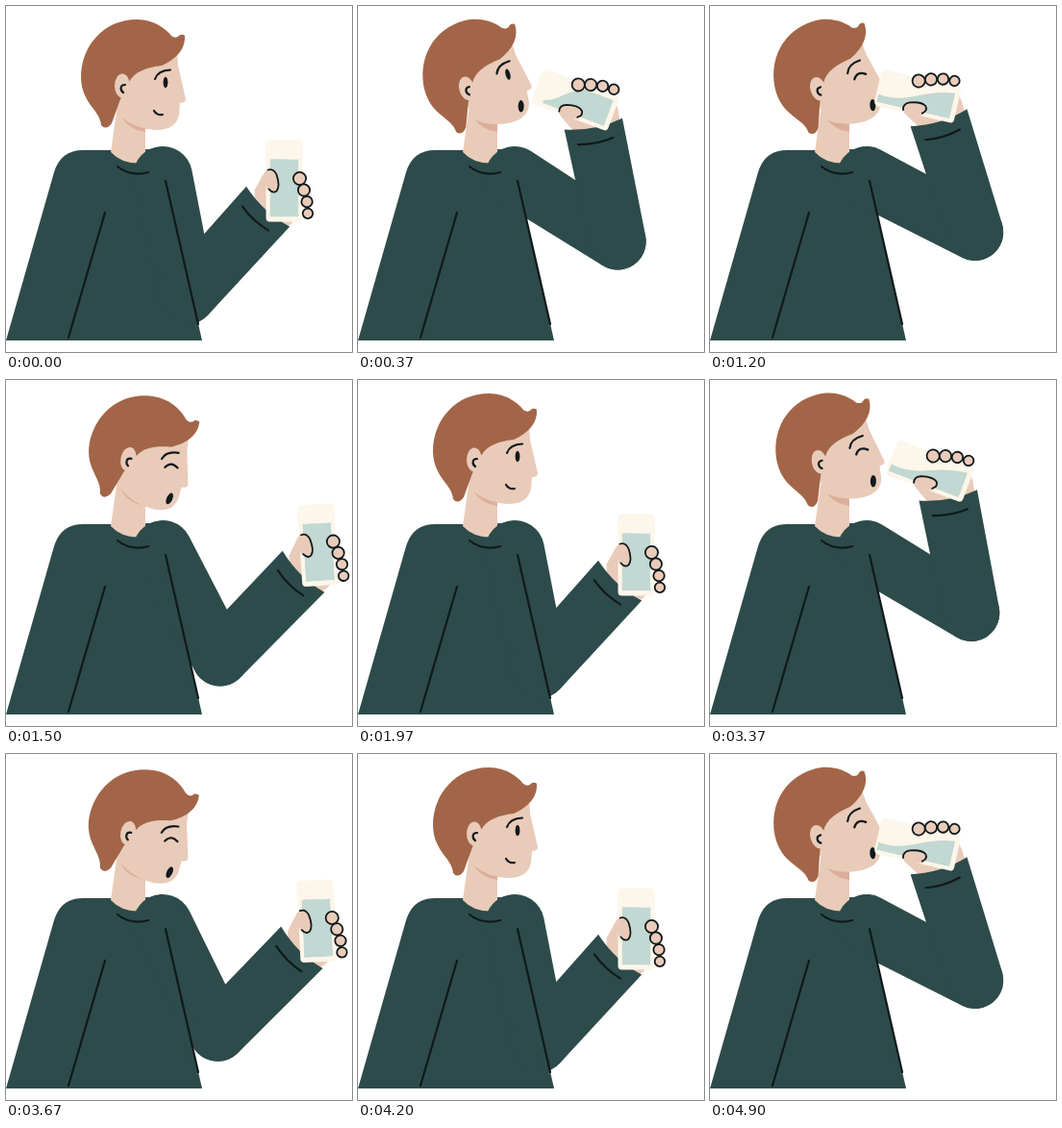
Recreate the animation shown at these times as an HTML page. Size 360 by 360 pixels, loop 5000 ms.

```html
<!DOCTYPE html>
<html lang="en">
<head>
<meta charset="utf-8">
<title>Drinking a glass of water</title>
<style>
  html, body { margin: 0; height: 100%; overflow: hidden; background: #fff; }
  svg { display: block; width: 100vw; height: 100vh; }
  .skin { fill: #e9cbb9; }
  .hair { fill: #a36548; }
  .wool { fill: #2d4b4a; }
  .cream { fill: #fdf6ea; }
  .ink { fill: none; stroke: #10191b; stroke-width: 2.2; stroke-linecap: round; }
  .thin { stroke-width: 1.8; }
  .dot { fill: #10191b; }
</style>
</head>
<body>
<svg viewBox="0 0 360 360">
  <defs>
    <clipPath id="inner"><path d="M-15-40H15V38H-15Z"/></clipPath>
  </defs>

  <path class="wool" d="M0 348L50 173Q57 150 80 150L110 150L150 149Q158 146 166 147L166 181L204 348Z"/>
  <path class="skin" d="M117 96L109 152Q122 166 145 163V100Z"/>
  <path d="M119 113Q126 128 145 131V112Z" fill="#dcae9a"/>

  <g id="head">
    <path class="skin" d="M116 88L128 66L158 55L178 46L179 62L187 97Q187 101 181 101L180 113Q177 129 156 129Q134 128 119 115Z"/>
    <path class="hair" d="M186 31C187 44 178 55 162 62C146 64 134 68 128 79L119 97L110 122Q104 130 99 124C98 108 79 102 78 75C78 40 103 14 136 14C156 14 168 26 172 31Q177 35 181 30Q185 29 186 31Z"/>
    <ellipse class="skin" cx="121" cy="83" rx="8" ry="12.5"/>
    <path class="ink" d="M124 82C118 82 119 88 122 90"/>
    <path class="ink" d="M155 76Q158 67 171 66.5"/>
    <ellipse id="eye" class="dot" cx="166" cy="79.5" rx="2.4" ry="5.8"/>
    <path id="shut" class="ink" d="M160 84Q165 76 173 82"/>
    <path id="smile" class="ink" d="M154 109Q157 114 163 113"/>
    <ellipse id="gape" class="dot" cx="171" cy="115" rx="3" ry="6.2" transform="rotate(14 171 115)"/>
  </g>

  <g id="upper">
    <path class="wool" d="M0-31L127-29.5A29.5 29.5 0 0 1 127 29.5L0 31A31 31 0 0 1 0-31Z"/>
    <g id="fore">
      <g class="hand">
        <path class="skin" d="M-22-6L-6 0L16 38L6 46L-8 54L-30 40L-31 10Z"/>
      </g>
      <path class="wool" d="M0-29.5L125-32Q117 0 125 29.5H0A29.5 29.5 0 0 1 0-29.5Z"/>
      <path class="ink" d="M107-21Q103-2 107 16"/>
      <g class="hand">
        <rect class="cream" x="-19" y="-36" width="38" height="79" rx="4"/>
        <rect class="cream" x="-19.5" y="-42" width="39" height="22" rx="5"/>
        <path id="water" fill="#c2d8d2" clip-path="url(#inner)"/>
        <path class="skin" d="M-22-6Q-18-14-11-11C-4-8-5 8-8 11Q-13 14-18 9Z"/>
        <path class="ink thin" d="M-17-11Q-11-13-8-6Q-4 6-8 11Q-12 14-16 9"/>
        <g id="fingers" stroke="#10191b" stroke-width="1.8"></g>
      </g>
    </g>
  </g>

  <path class="ink" d="M166 182L200 331"/>
  <path class="ink" d="M103 215L65 345"/>
  <path class="ink" d="M116 167Q130 178 148 173"/>
</svg>
<script>
const $ = id => document.getElementById(id);
const hands = document.querySelectorAll('.hand');
const LOOP = 5000, CYCLE = 2100, BEAT = 700;

// water surface inside the glass, as cubic curve points
const LEVEL = [-15, -22, -5, -23, 5, -21, 15, -22];
const POURED = [-7, -40, -11, -8, 9, 4, 12, 38];

for (let i = 0; i < 4; i++) {
  const x = 16 + 8.5 * Math.sin(i * 0.55), y = 12.1 * i - 2, r = 6.6 - 0.45 * i;
  $('fingers').innerHTML += `<circle class="skin" cx="${x}" cy="${y}" r="${r}"/>`;
}

// smooth 0 to 1 between two times
function ease(t, from, to) {
  const p = Math.min(1, Math.max(0, (t - from) / (to - from)));
  return (1 - Math.cos(Math.PI * p)) / 2;
}

// ten drawings per beat, the first one held longer
function onTens(t) {
  const b = t % BEAT, step = 200 / 3;
  return t - b + (b < 100 ? 0 : 100 + Math.floor((b - 99) / step) * step);
}

const place = (el, transform) => el.setAttribute('transform', transform);
const show = (id, on) => $(id).setAttribute('visibility', on ? 'visible' : 'hidden');

function draw(time) {
  const t = onTens(time % LOOP % CYCLE);
  const lift = ease(t, 0, 460) - ease(t, 1200, 1520);
  const lean = ease(t, 1200, 1520) - ease(t, 1520, 1830);
  const pour = ease(t, 250, 500) - ease(t, 1270, 1480);

  const upper = 78.3 - 50.9 * lift - 16 * lean;
  const fore = -47.3 - 59.7 * lift + 2.5 * lean;
  const hand = -77 * lift - 3 * lean;
  const head = -16 * lift + 11.5 * lean;

  place($('upper'), `translate(163 177) rotate(${upper})`);
  place($('fore'), `translate(127 0) rotate(${fore - upper})`);
  for (const h of hands)
    place(h, `translate(125 0) rotate(${hand - fore}) translate(16 -28)`);
  place($('head'), `rotate(${head} 128 115)`);

  const [x, y, ...curve] = LEVEL.map((v, i) => v + (POURED[i] - v) * pour);
  $('water').setAttribute('d', `M-15 38V${y}H${x}C${curve}V38Z`);

  const closed = t > 400 && t < 1640;
  const open = t > 350 && t < 1640;
  show('eye', !closed);
  show('shut', closed);
  show('smile', !open);
  show('gape', open);
}

const start = performance.now();
function tick() {
  draw(performance.now() - start);
  requestAnimationFrame(tick);
}
tick();
</script>
</body>
</html>
```
